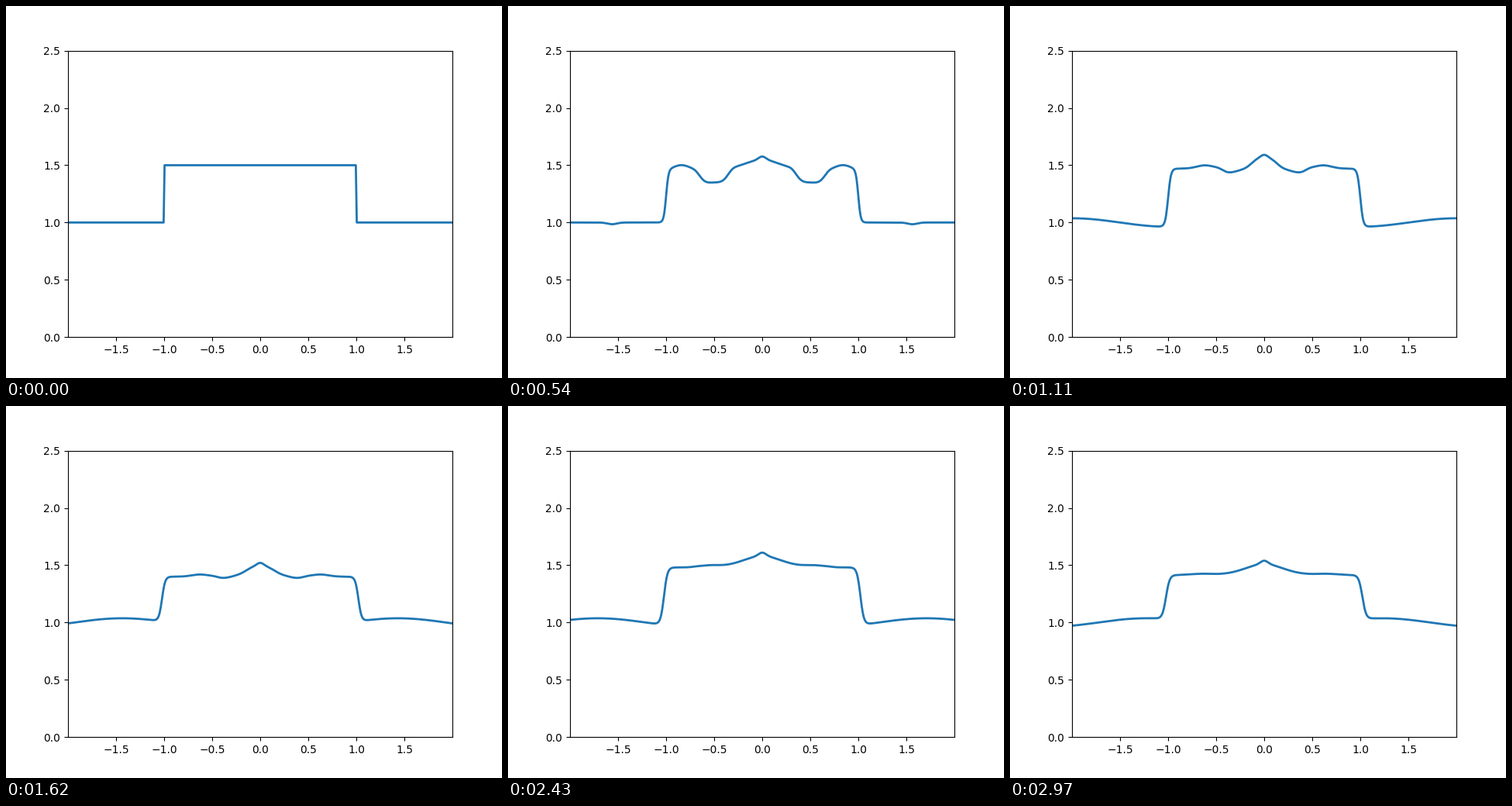
A matplotlib script for the animation above (3000 ms loop, 640 by 480 pixels).

```python
import numpy as np
import matplotlib.pyplot as plt
from matplotlib.animation import FuncAnimation

FRAMES, INTERVAL = 100, 30
SPEED = 0.117      # pulse speed in the dense gas, per frame
FOCUS = 5.2        # the pulse meets its mirror image at the centre
ECHO = FOCUS + 1 / SPEED  # it reaches the walls and turns into a trough

x = np.linspace(-2, 2, 801)
r = np.abs(x)
r_in, r_out = np.minimum(r, 1), np.maximum(r, 1)


def bell(d, width, power=2):
    return np.exp(-np.abs(d / width) ** power)


def smooth(t):
    t = np.clip(t, 0, 1)
    return t * t * (3 - 2 * t)


def bounce(path):
    """Place on [0, 1] after a path reflected at both ends."""
    return 1 - abs(path % 2 - 1)


def pair(place, width, power=2):
    return bell(r_in - place, width, power) + bell(r_in + place, width, power)


def inner(n):
    """Dense gas: a hill left at the centre, a slow swell and two pulses."""
    hill = 1.445 + .09 * bell(r_in, .27) + .03 * bell(r_in, .055)
    swell = .045 * np.cos(2 * np.pi * (n - 81) / 52)
    y = 1.5 + (hill + swell - 1.5) * smooth(n / 15)

    height = .11 * np.tanh((ECHO - n) / 1.5) * smooth(n / 5)
    height *= np.exp(-max(0, n - 18) / 25)
    y += height * pair(bounce(SPEED * (n - FOCUS)), .16, 4)

    crest = .045 * smooth((n - 6) / 12) * np.exp(-(n - 18) / 40)
    return y + crest * pair(bounce(SPEED * (n - 18) - 2.84), .12)


def outer(n):
    """Thin gas: a weak front runs out, then a long wave fills the space."""
    front = 1 + .13 * (n - ECHO) + .01
    dip = -.015 * smooth((n - ECHO) / 3) * bell(r_out - front, .07)
    phase = np.pi * (r_out - 1) - np.pi - .265 * (n - 37)
    return 1 + dip + .037 * smooth((n - 18) / 15) * np.cos(phase)


def density(n):
    wall = 1 + .022 * smooth((n - 37) / 16)
    width = max(.001, .025 * (n / 18) ** .25)
    inside = (1 + np.tanh((wall - r) / width)) / 2
    low = outer(n)
    return low + (inner(n) - low) * inside


fig, ax = plt.subplots(figsize=(6.4, 4.8), dpi=100)
ax.set(xlim=(-2, 2), ylim=(0, 2.5), xticks=np.arange(-1.5, 1.6, .5),
       yticks=np.arange(0, 2.6, .5))
line, = ax.plot(x, density(0), color="#1f77b4", lw=2)


def update(n):
    line.set_ydata(density(n))
    return line,


anim = FuncAnimation(fig, update, frames=FRAMES, interval=INTERVAL,
                     repeat=True, repeat_delay=0)
plt.show()
```
